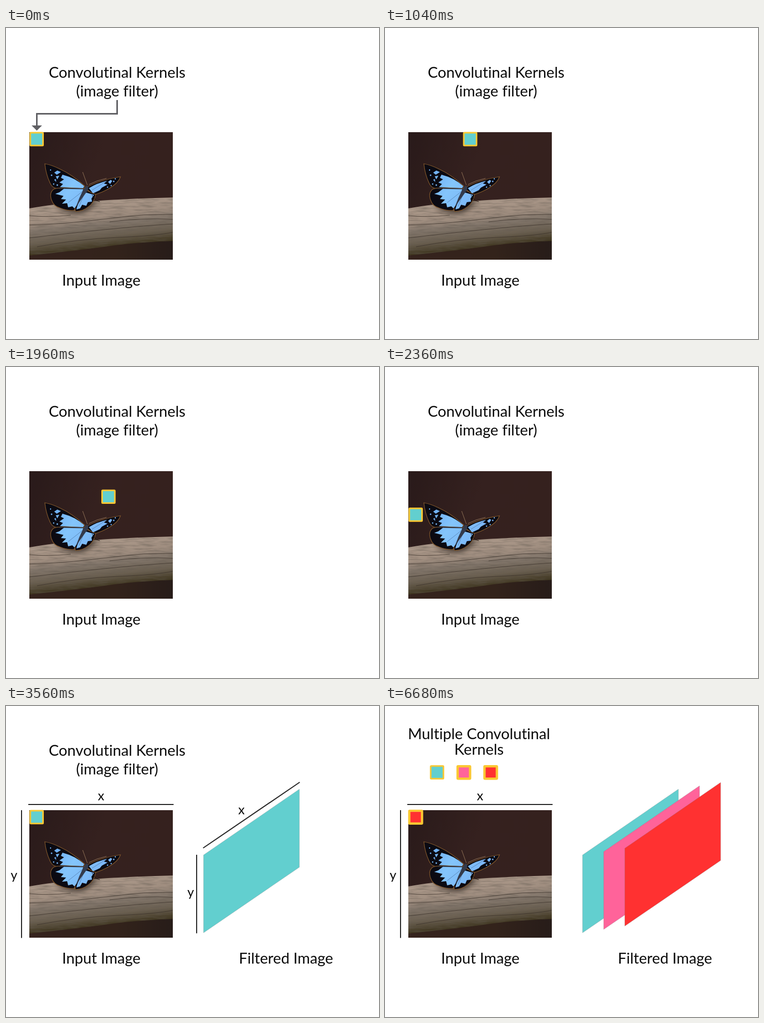
Animation of 720x600 px, one loop 8 s. Source, as an HTML page:

```html
<!DOCTYPE html>
<html lang="en">
<head>
<meta charset="utf-8">
<title>Convolutional kernels</title>
<style>
  html, body { margin: 0; height: 100%; overflow: hidden; background: #fff; }
  svg { display: block; width: 100%; height: 100%; }
  text { font: 29.15px Lato, sans-serif; font-variant-ligatures: none; text-anchor: middle; fill: #0a0a0a; }
  .axis text { font-size: 25px; }
  .axis path { fill: none; stroke: #242424; stroke-width: 2; }
  .sheet { stroke: #777; stroke-opacity: .5; stroke-width: .6; }
  .teal { fill: #62cfcf; }
  .pink { fill: #ff639a; }
  .red { fill: #ff3131; }
  .frame { stroke: #fac832; }
  .blue { fill: url(#shimmer); }
  .wing { fill: #0b0a12; stroke: #80562a; stroke-width: 1.2; }
  .crack { fill: none; stroke: #382f28; stroke-width: 1; stroke-opacity: .75; }
</style>
</head>
<body>
<svg viewBox="0 0 720 600">
  <defs>
    <linearGradient id="backdrop" x2="1" y2=".3">
      <stop offset="0" stop-color="#291a1a"/>
      <stop offset=".5" stop-color="#35211f"/>
      <stop offset="1" stop-color="#35211e"/>
    </linearGradient>
    <linearGradient id="ground" x2="1">
      <stop offset="0" stop-color="#35231d"/>
      <stop offset=".6" stop-color="#33231b"/>
      <stop offset="1" stop-color="#271c19"/>
    </linearGradient>
    <linearGradient id="wood" gradientUnits="userSpaceOnUse" x1="178" y1="332" x2="188" y2="426">
      <stop offset="0" stop-color="#ad9a8b"/>
      <stop offset=".33" stop-color="#a08e80"/>
      <stop offset=".5" stop-color="#82766b"/>
      <stop offset=".75" stop-color="#6a5f50"/>
      <stop offset="1" stop-color="#393019"/>
    </linearGradient>
    <linearGradient id="shimmer" gradientUnits="userSpaceOnUse" x1="95" y1="280" x2="190" y2="345">
      <stop offset="0" stop-color="#70b0f4"/>
      <stop offset=".35" stop-color="#84c5fb"/>
      <stop offset="1" stop-color="#78b1f5"/>
    </linearGradient>
    <filter id="grain" x="0" y="0" width="1" height="1">
      <feTurbulence type="fractalNoise" baseFrequency=".035 .3" numOctaves="3" seed="4"/>
      <feColorMatrix values="0 0 0 0 .12  0 0 0 0 .1  0 0 0 0 .08  1.8 0 0 0 -.7"/>
      <feComposite in2="SourceGraphic" operator="in"/>
    </filter>
    <filter id="soft"><feGaussianBlur stdDeviation="4"/></filter>
    <clipPath id="photo"><path d="M45 201H322V447H45Z"/></clipPath>
    <path id="sheet" d="M381.3 287.5L566.3 160.5V311L381.3 437.5Z"/>
    <path id="branch" d="M45 348Q90 340 140 336Q230 329 322 327V411Q250 413 190 422Q130 430 45 439Z"/>
  </defs>

  <g clip-path="url(#photo)">
    <path fill="url(#backdrop)" d="M45 201H322V447H45Z"/>
    <path fill="url(#ground)" d="M45 400H322V447H45Z"/>
    <use href="#branch" fill="url(#wood)"/>
    <use href="#branch" filter="url(#grain)" opacity=".55"/>
    <g class="crack">
      <path d="M45 380Q100 379 160 372T250 362T322 360"/>
      <path d="M45 405Q130 395 200 388T322 378"/>
      <path d="M45 362Q80 366 125 361M200 374Q260 366 322 369"/>
      <path d="M60 422Q140 407 215 404T322 394"/>
    </g>
    <path d="M95 347Q135 338 178 332L170 343Q150 364 120 356Z" fill="#2c211d" opacity=".65" filter="url(#soft)"/>

    <path class="wing" d="M152 305Q128 283 104 272Q88 264 75 262Q77 282 85 299Q89 308 96 309L150 311Z"/>
    <path class="wing" d="M150 310Q104 306 92 311Q83 318 88 332Q92 344 104 347Q118 353 131 352Q146 335 152 315Z"/>
    <path class="wing" d="M153 309Q180 293 221 287Q217 299 200 309Q187 317 170 322Z"/>
    <path class="wing" d="M154 313L173 321Q171 336 159 345Q148 354 134 354Q131 345 139 333Z"/>
    <g class="blue">
      <path d="M151 305Q133 289 109 283L106 289L112 292L103 298L110 301L104 307L149 309Z"/>
      <path d="M149 311L112 310L103 317L95 320L111 324L106 330L116 331L108 339L118 338L120 346L128 344L132 348Q146 332 149 311Z"/>
      <path d="M160 309Q176 299 195 295L189 300L196 302L185 308L181 313L168 319Z"/>
      <path d="M153 317L170 322L165 329L166 335L158 336L155 343L147 341L143 348L136 350Q137 340 153 317Z"/>
      <path d="M93 279L99 275L106 278L98 283ZM96 286L103 285L99 292ZM93 293L96 291L97 297ZM197 297L202 293L205 295L201 301Z"/>
      <circle cx="86" cy="274" r="1.2"/><circle cx="88" cy="284" r="1.5"/>
      <circle cx="92" cy="301" r="1.3"/><circle cx="99" cy="303" r="1.5"/>
      <circle cx="208" cy="296" r="1.4"/><circle cx="211" cy="291" r="1.2"/>
      <circle cx="203" cy="304" r="1.2"/><circle cx="196" cy="307" r="1.3"/>
    </g>
    <path d="M149 310H102M148 315L120 337M166 313L190 298M151 320L141 344" fill="none" stroke="#38557d" stroke-width=".5"/>
    <path d="M155 304Q161 305 158 313Q150 324 135 345Q141 328 149 312Z" fill="#343b4c"/>
    <path d="M157 303L148 278M160 302Q175 294 194 290" fill="none" stroke="#a58464" stroke-width=".8"/>
    <path d="M166 322L174 333L181 335" fill="none" stroke="#251914"/>
  </g>

  <g data-to="5040">
    <text x="214.5" y="96">Convolutinal Kernels</text>
    <text x="214.5" y="132">(image filter)</text>
  </g>
  <g data-to="720">
    <path d="M214.5 139V165.5H59.5V190" fill="none" stroke="#606064" stroke-width="3"/>
    <path d="M49.5 188H69.5L59.5 198Z" fill="#606064"/>
  </g>
  <text x="184" y="497">Input Image</text>

  <g data-from="3560">
    <g class="axis">
      <path d="M43 190H323.5M30 201V447.5"/>
      <text x="183.5" y="182">x</text>
      <text x="15.5" y="335">y</text>
    </g>
    <text x="540.5" y="497">Filtered Image</text>
    <use href="#sheet" class="sheet teal"/>
  </g>
  <g class="axis" data-from="3560" data-to="5040">
    <path d="M380.5 274L567 147M368 287V438.5"/>
    <text x="454.5" y="209">x</text>
    <text x="356.5" y="368">y</text>
  </g>

  <g data-from="5040">
    <text x="181.5" y="64">Multiple Convolutinal</text>
    <text x="181.5" y="94">Kernels</text>
    <rect class="frame teal" x="88.2" y="115.7" width="24.6" height="24.6" rx="1" stroke-width="3"/>
    <rect class="frame pink" x="140.2" y="116.2" width="24" height="24" rx="1" stroke-width="4.6"/>
    <use href="#sheet" class="sheet pink" x="40.8" y="-6.5"/>
  </g>
  <g data-from="6680">
    <rect class="frame red" x="192" y="116.2" width="24" height="24" rx="1" stroke-width="4.6"/>
    <use href="#sheet" class="sheet red" x="81.6" y="-13"/>
  </g>

  <rect id="kernel" class="frame" x="-12.3" y="-12.3" width="24.6" height="24.6" rx="1"/>
</svg>
<script>
  const LOOP = 8000, TICK = 40, HOME = { x: 59.2, y: 214.4 };
  // Each row is scanned left to right in equal hops, one per tick.
  const rows = [
    { start: 720, end: 1520, hop: 13.15, y: HOME.y },
    { start: 1520, end: 2360, hop: 12.6, y: 250.3 },
    { start: 2360, end: 3160, hop: 13.2, y: 285 }
  ];
  const kernel = document.getElementById('kernel');
  const timed = document.querySelectorAll('[data-from], [data-to]');

  function kernelPosition(t) {
    const row = rows.find(r => t >= r.start && t < r.end);
    if (!row) return HOME;
    return { x: HOME.x + Math.floor((t - row.start) / TICK) * row.hop, y: row.y };
  }

  function render(t) {
    for (const el of timed) {
      const { from = 0, to = LOOP } = el.dataset;
      el.style.display = t >= +from && t < +to ? '' : 'none';
    }
    const { x, y } = kernelPosition(t);
    const color = t < 5040 ? 'teal' : t < 6680 ? 'pink' : 'red';
    kernel.setAttribute('class', 'frame ' + color);
    kernel.setAttribute('stroke-width', color === 'teal' ? 3 : 4.4);
    kernel.setAttribute('transform', `translate(${x} ${y})`);
  }

  const origin = performance.now();
  function loop() {
    render((performance.now() - origin) % LOOP);
    requestAnimationFrame(loop);
  }
  loop();
</script>
</body>
</html>
```
